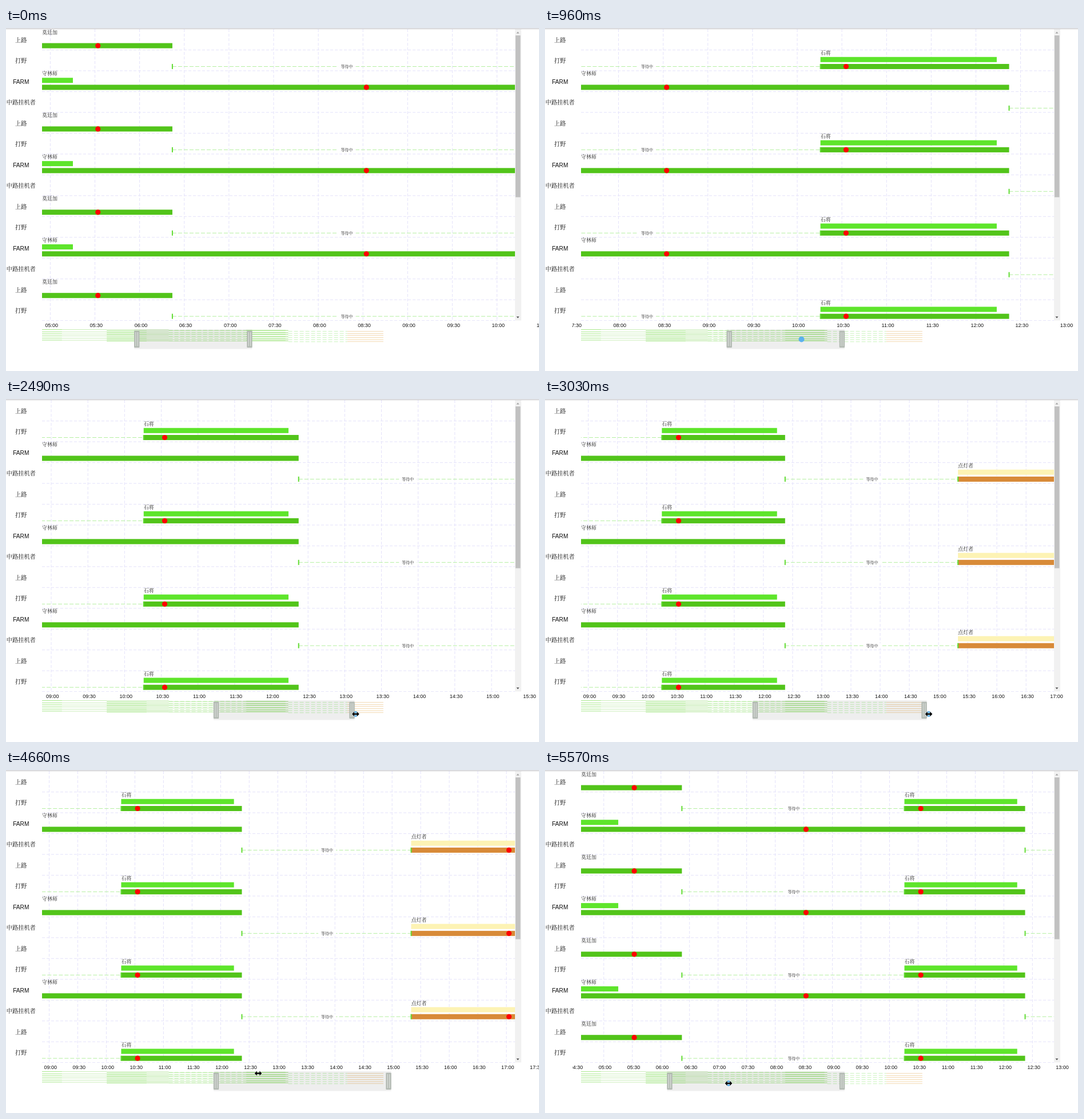
Recreate the animation shown at these times as an HTML page. Size 932 px wide and 601 px high, loop 5640 ms.

```html
<!DOCTYPE html>
<html lang="zh">
<head>
<meta charset="utf-8">
<title>Timeline zoom</title>
<style>
  html, body { margin: 0; width: 100%; height: 100%; overflow: hidden; background: #fff; }
  svg { display: block; width: 932px; height: 601px; }
  text { font-family: "Liberation Sans", "Noto Serif CJK SC", "Noto Sans CJK SC", sans-serif; fill: #111; }
  .row { font-size: 10.2px; text-anchor: middle; }
  .hour { font-size: 9px; text-anchor: middle; }
  .name { font-size: 9px; fill: #222; }
  .wait { font-size: 7px; text-anchor: middle; fill: #222; }
  .grid { stroke: #e4e2fa; stroke-dasharray: 5 3; }
  .idle { stroke: #b4efa0; stroke-dasharray: 7 3; }
  .pointer { fill: #000; stroke: #fff; stroke-width: .9; paint-order: stroke; }
</style>
</head>
<body>
<svg viewBox="0 0 932 601">
  <defs>
    <clipPath id="plotClip"><rect x="63" y="2" width="827" height="511"/></clipPath>
    <clipPath id="hourClip"><rect x="48" y="510" width="884" height="20"/></clipPath>
  </defs>
  <rect y=".7" width="932" height="1.3" fill="#c4c4c8"/>
  <g id="labels"></g>
  <g id="plot" clip-path="url(#plotClip)"></g>
  <g id="hours" clip-path="url(#hourClip)"></g>
  <g>
    <rect x="890" y="2" width="11" height="510.5" fill="#f1f1f1"/>
    <rect x="891" y="13" width="8.5" height="283.5" fill="#c1c1c1"/>
    <path d="M892.5 9.5h5l-2.5-3z" fill="#a3a3a3"/>
    <path d="M892.5 505.5h5l-2.5 3z" fill="#505050"/>
  </g>
  <g id="overview"></g>
  <g id="slider"></g>
  <g id="mouse"></g>
</svg>
<script>
const LOOP = 5640, LEFT = 63, RIGHT = 890, TOP = 2, ROW = 36.475;
const MIN_PER_PX = 1.715, MINI_MIN_PER_PX = 1.724, MINI_TOP = 528, MINI = 0.025;
const GREEN = '#52c41a', LIME = '#5ee52b', ORANGE = '#d88a38', CREAM = '#fdf3b4';

// Minutes of the day for each kind of row
const KINDS = [
  { label: '上路', name: '莫廷加', start: 0, plan: 60, end: 382, dot: 332 },
  { label: '打野', name: '石将', start: 615.6, plan: 734, end: 742.3, dot: 632.8, idle: 382 },
  { label: 'FARM', name: '守林师', start: 195, plan: 315.2, end: 742.3, dot: 512.3 },
  { label: '中路挂机者', name: '点灯者', start: 920, plan: 1029, end: 1029, dot: 1022.7, idle: 742.3,
    dark: ORANGE, light: CREAM }
];

// Time in ms, then values; straight lines between
const LEFT_HANDLE = [[660, 228.7], [960, 322.2], [1030, 322.2], [1210, 352], [1260, 352],
  [1420, 367.5], [5160, 367.5], [5570, 218]];
const SPAN = [[2210, 197.2], [2760, 276], [2860, 276], [3030, 295.5], [3100, 295.5], [3340, 301.5]];
const MOUSE = [
  [660, 355, 545.5], [960, 448.5, 545.5], [1030, 448.5, 545.5], [1210, 478, 545.5], [1260, 478, 545.5],
  [1420, 493.5, 545.5], [1500, 494, 546], [1630, 586.5, 543.5], [1670, 586.5, 543.5], [1790, 571, 552],
  [2210, 571, 552], [2760, 650, 552], [2860, 650, 552], [3030, 671, 552], [3100, 671, 552],
  [3340, 673, 552], [3440, 673, 552], [3600, 580, 502.5], [3660, 580, 502.5], [4000, 282, 360],
  [4040, 282, 360], [4200, 360, 516], [4400, 243, 330], [4480, 250, 273], [4580, 262, 283],
  [4620, 262, 283], [4660, 441, 531.5], [4700, 441, 531.5], [4800, 482, 548], [4980, 470.5, 549],
  [5160, 470.5, 549], [5570, 321, 549]
];
const PRESSES = [[660, 1440], [1890, 3440], [4960, LOOP]];
const ARROWS = [[1500, 1790], [3440, 4650]];

const byId = id => document.getElementById(id);
const within = (ranges, t) => ranges.some(([a, b]) => t >= a && t < b);
const show = (node, on) => node.setAttribute('visibility', on ? 'visible' : 'hidden');

function set(node, attrs) {
  for (const key in attrs) node.setAttribute(key, attrs[key]);
  return node;
}

function add(parent, tag, attrs, text) {
  const node = set(document.createElementNS('http://www.w3.org/2000/svg', tag), attrs);
  if (text) node.textContent = text;
  return parent.appendChild(node);
}

function sample(keys, t) {
  const next = keys.findIndex(k => k[0] > t);
  if (next === 0) return keys[0].slice(1);
  if (next < 0) return keys[keys.length - 1].slice(1);
  const a = keys[next - 1], b = keys[next], p = (t - a[0]) / (b[0] - a[0]);
  return a.slice(1).map((v, i) => v + (b[i + 1] - v) * p);
}

const live = []; // callbacks that place nodes for a minute-to-x function
const plot = byId('plot');

function addBar(y, from, to, fill) {
  const bar = add(plot, 'rect', { y, height: 9, fill });
  live.push(x => set(bar, { x: x(from), width: x(to) - x(from) }));
}

function addIdle(y, from, to) {
  const line = add(plot, 'line', { class: 'idle', y1: y, y2: y });
  const gap = add(plot, 'rect', { y: y - 4, width: 31, height: 8, fill: '#fff' });
  const text = add(plot, 'text', { class: 'wait', y: y + 2.7 }, '等待中');
  live.push(x => {
    const mid = (x(from) + x(to)) / 2 + 1;
    set(line, { x1: x(from), x2: x(to) });
    set(gap, { x: mid - 15.5 });
    set(text, { x: mid });
  });
}

function addTick(y, at) {
  const tick = add(plot, 'rect', { y: y - 4.5, width: 2, height: 9, fill: '#62dc34' });
  live.push(x => set(tick, { x: x(at) - 1 }));
}

function addRow(i) {
  const k = KINDS[i % 4], top = TOP + i * ROW, mid = top + 29;
  add(byId('labels'), 'text', { class: 'row', x: 26.3, y: top + 22.8 }, k.label);
  if (k.idle) addIdle(mid, k.idle, k.start);
  addBar(top + 12.3, k.start, k.plan, k.light || LIME);
  addBar(top + 24.5, k.start, k.end, k.dark || GREEN);
  if (k.idle) [k.idle, k.start].forEach(at => addTick(mid, at));
  const dot = add(plot, 'circle', { cy: mid, r: 4.6, fill: '#f00' });
  const name = add(plot, 'text', { class: 'name', y: top + 8.5 }, k.name);
  live.push(x => {
    set(dot, { cx: x(k.dot) });
    set(name, { x: Math.max(LEFT, x(k.start)) });
    show(name, x(k.end) > LEFT);
  });
}

function addHour(i) {
  const two = n => String(n).padStart(2, '0');
  const line = add(plot, 'line', { class: 'grid', y1: TOP, y2: 513 });
  const text = add(byId('hours'), 'text', { class: 'hour', y: 523.8 },
    two(i >> 1) + ':' + (i % 2 ? '30' : '00'));
  live.push(x => {
    set(line, { x1: x(i * 30), x2: x(i * 30) });
    set(text, { x: x(i * 30) + 2.3 });
  });
}

function addMiniRow(i) {
  const k = KINDS[i % 4], box = byId('overview'), top = MINI_TOP + i * ROW * MINI;
  const x = m => LEFT + m / MINI_MIN_PER_PX;
  const strip = (offset, to, fill) => add(box, 'rect',
    { x: x(k.start), y: top + offset * MINI, width: x(to) - x(k.start), height: .3, fill });
  strip(12.3, k.plan, k.light || LIME);
  strip(24.5, k.end, k.dark || GREEN);
  if (k.idle) {
    const y = top + 29 * MINI;
    add(box, 'line', { class: 'idle', x1: x(k.idle), x2: x(k.start), y1: y, y2: y, 'stroke-width': .7 });
  }
}

for (let i = 0; i <= 36; i++) addHour(i);
for (let i = 1; i <= 14; i++) {
  const y = TOP + i * ROW;
  add(plot, 'line', { class: 'grid', x1: LEFT, x2: RIGHT, y1: y, y2: y });
}
for (let i = 0; i < 14; i++) addRow(i);
for (let i = 0; i < 24; i++) addMiniRow(i);

const slider = byId('slider'), mouse = byId('mouse');
const shade = add(slider, 'rect', { y: 528, height: 34.5, fill: 'rgba(0,0,0,.065)' });

function addHandle() {
  const g = add(slider, 'g', {});
  add(g, 'rect', { x: -4.7, y: 530.5, width: 9.4, height: 29.5, rx: 1, fill: '#b3bab3' });
  for (const x of [-2.2, 1.2]) add(g, 'rect', { x, y: 533, width: 1, height: 24.5, fill: '#e6e9e6' });
  return g;
}
const handles = [addHandle(), addHandle()];

const press = add(mouse, 'circle', { r: 5, fill: '#5cb1ee' });
const ring = add(mouse, 'circle', { fill: 'none', stroke: '#6cc5e4' });
const arrow = add(mouse, 'path', { class: 'pointer',
  d: 'M0 0V12L2.8 9.5 4.7 13.7 6.8 12.8 5 8.7H8.6Z' });
const resize = add(mouse, 'path', { class: 'pointer',
  d: 'M-6.3 0l4-4.3v3h4.6v-3l4 4.3-4 4.3v-3h-4.6v3z' });

function draw(t) {
  const [l] = sample(LEFT_HANDLE, t), r = l + sample(SPAN, t)[0];
  const start = (l - LEFT + 6) * MIN_PER_PX, end = (r - LEFT - 6) * MIN_PER_PX;
  const scale = (RIGHT - LEFT) / (end - start);
  const x = m => LEFT + (m - start) * scale;
  live.forEach(place => place(x));

  set(shade, { x: l - 4.5, width: r - l + 9 });
  [l, r].forEach((at, i) => set(handles[i], { transform: `translate(${at})` }));

  const [mx, my] = sample(MOUSE, t), at = { transform: `translate(${mx} ${my})` };
  [press, arrow, resize].forEach(node => set(node, at));
  const isArrow = within(ARROWS, t);
  show(press, within(PRESSES, t));
  show(arrow, isArrow);
  show(resize, t >= 1790 && !isArrow);

  // A ring spreads from the spot where the button is let go
  const up = PRESSES.map(p => p[1]).find(end => t >= end && t < end + 300);
  show(ring, up);
  if (up) {
    const [cx, cy] = sample(MOUSE, up);
    set(ring, { cx, cy, r: 5 + (t - up) * .025, opacity: Math.min(1, 1.3 - (t - up) / 250) });
  }
}

const origin = performance.now();
function tick() {
  draw((performance.now() - origin) % LOOP);
  requestAnimationFrame(tick);
}
tick();
</script>
</body>
</html>
```
